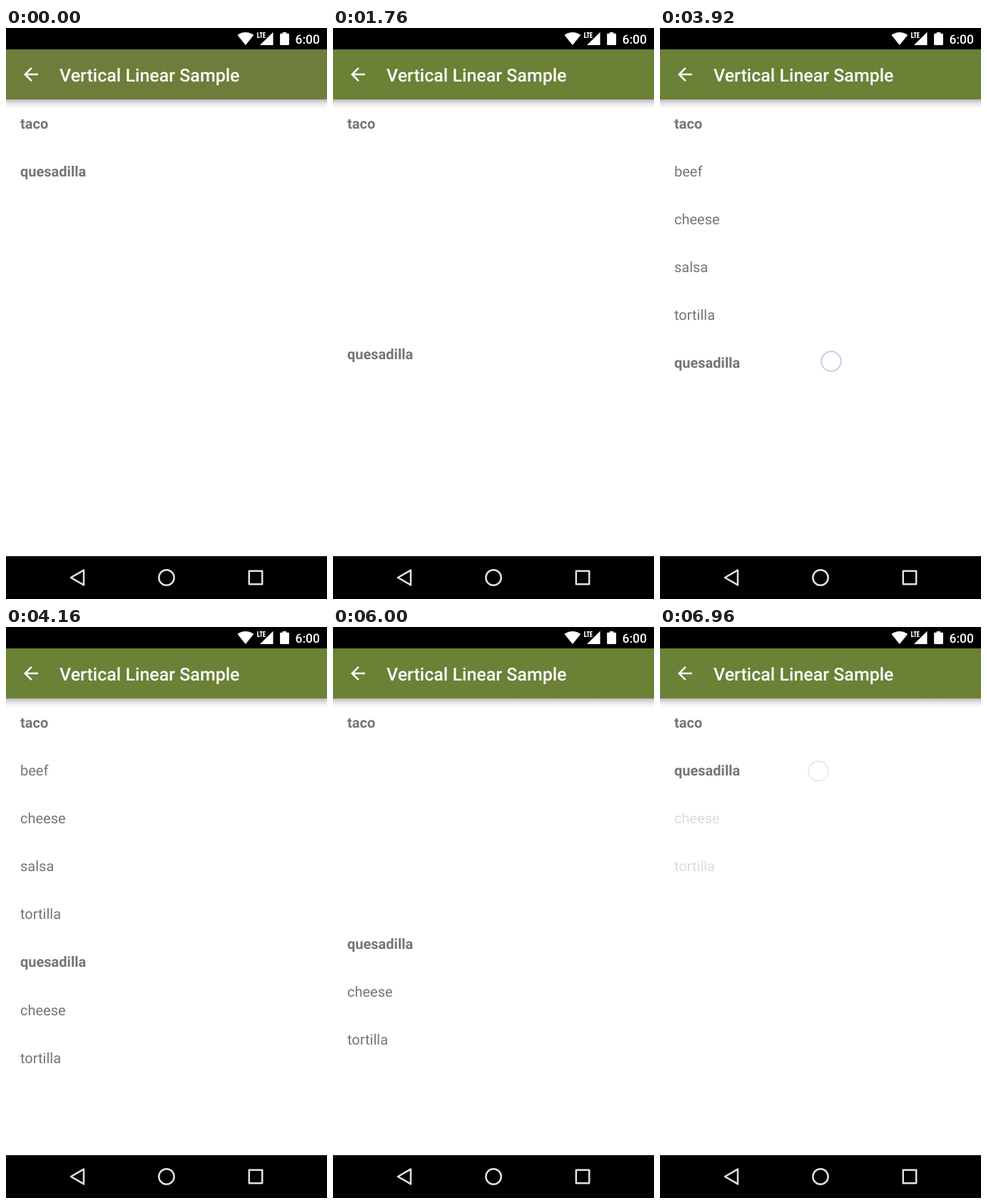
An HTML page that plays this animation: 450 px wide and 800 px high, repeating every 7040 ms.

```html
<!DOCTYPE html>
<html lang="en">
<head>
<meta charset="utf-8">
<title>Vertical Linear Sample</title>
<style>
  html, body { margin: 0; width: 100%; height: 100%; overflow: hidden; background: #fff; }
  svg { display: block; width: 100%; height: 100%; font-family: Roboto, sans-serif; text-rendering: geometricPrecision; }
  #list { font-size: 20px; fill: #757575; }
  .head { font-weight: 700; }
</style>
</head>
<body>
<svg viewBox="0 0 450 800">
  <defs>
    <linearGradient id="shade" x2="0" y2="1">
      <stop offset="0" stop-color="#302838" stop-opacity=".34"/>
      <stop offset=".3" stop-color="#302838" stop-opacity=".17"/>
      <stop offset=".65" stop-color="#302838" stop-opacity=".05"/>
      <stop offset="1" stop-color="#302838" stop-opacity="0"/>
    </linearGradient>
  </defs>
  <rect width="450" height="800" fill="#fff"/>
  <g id="list"></g>
  <rect y="100" width="450" height="14" fill="url(#shade)"/>

  <rect id="bar" y="30" width="450" height="70"/>
  <path transform="translate(20 50) scale(1.25)" fill="#fff" d="M20 11H7.83l5.59-5.59L12 4l-8 8 8 8 1.41-1.41L7.83 13H20z"/>
  <text x="75" y="74.5" font-size="25" font-weight="500" fill="#fff">Vertical Linear Sample</text>

  <rect width="450" height="30"/>
  <g fill="#fff">
    <path transform="translate(324.2 3.1) scale(.97)" d="M12 21.5 23.64 7C23.2 6.66 18.7 3 12 3S.8 6.66.36 7z"/>
    <path d="M356 24H374.5V5.8z"/>
    <path d="M352.8 6v7.2h3M355.6 6.7h4M357.6 6.7V14M363.6 6.7h-2.6v6.5h2.6M361 9.9h2.4" fill="none" stroke="#000" stroke-width="3"/>
    <path d="M352.8 6v7.2h3M355.6 6.7h4M357.6 6.7V14M363.6 6.7h-2.6v6.5h2.6M361 9.9h2.4" fill="none" stroke="#fff" stroke-width="1.5"/>
    <path d="M387.7 6h5.6v1.8h2.4q1.2 0 1.2 1.2v13.8q0 1.2-1.2 1.2h-10.4q-1.2 0-1.2-1.2V9q0-1.2 1.2-1.2h2.4z"/>
    <text x="440" y="21.6" font-size="17.5" font-weight="500" text-anchor="end">6:00</text>
  </g>

  <rect y="740" width="450" height="60"/>
  <g fill="none" stroke="#e2e2e2" stroke-width="2.5" stroke-linejoin="round">
    <path d="M91 770 109 759.6V780.4z"/>
    <circle cx="225" cy="770" r="10.7"/>
    <rect x="340.8" y="760.8" width="18.4" height="18.4"/>
  </g>
  <circle id="touch" r="13.8" fill="none" stroke="#d0cfe8" stroke-width="2.2"/>
</svg>
<script>
const LOOP = 7040, TICK = 80;
const ROW = 67.1, BASE = 141;
const FADE = 120, MOVE = 250;
const $ = id => document.getElementById(id);

const clamp = x => Math.min(1, Math.max(0, x));
const ease = x => (1 - Math.cos(Math.PI * clamp(x))) / 2;
const fade = (t, on, off) => clamp((t - on) / FADE) - clamp((t - off) / FADE);

// x, y, pressed, released, gone
const touches = [
  [208, 127, 1520, 1600, 1680],
  [240, 467, 3920, 4080, 4160],
  [191, 134, 5760, 5920, 6000],
  [222, 202, 6800, 6960, 7040]
];

function group(words, row) {
  const g = document.createElementNS("http://www.w3.org/2000/svg", "g");
  words.forEach((word, i) => {
    const el = document.createElementNS(g.namespaceURI, "text");
    el.setAttribute("x", 20);
    el.setAttribute("y", BASE + (row + i) * ROW);
    el.textContent = word;
    g.append(el);
  });
  $("list").append(g);
  return g;
}

group(["taco"], 0).setAttribute("class", "head");
const fillings = group(["beef", "cheese", "salsa", "tortilla"], 1);
const second = group(["quesadilla"], 1);
second.setAttribute("class", "head");
const extras = group(["cheese", "tortilla"], 2);

function draw(t) {
  const shift = 4 * ROW * (ease((t - 1545) / MOVE) - ease((t - 5950) / MOVE));
  for (const g of [second, extras]) g.setAttribute("transform", `translate(0 ${shift})`);
  fillings.setAttribute("opacity", fade(t, 1795, 5830));
  extras.setAttribute("opacity", fade(t, 4000, 6870));
  $("bar").setAttribute("fill", t < 1600 ? "#6e7e3a" : "#6a8136");

  const hit = touches.find(([, , on, , off]) => t >= on && t < off);
  const dot = $("touch");
  dot.setAttribute("opacity", hit ? (t < hit[3] ? 1 : 0.45) : 0);
  if (hit) {
    dot.setAttribute("cx", hit[0]);
    dot.setAttribute("cy", hit[1]);
  }
}

const start = performance.now();
function frame() {
  const t = (performance.now() - start) % LOOP;
  draw(Math.floor(t / TICK) * TICK);
  requestAnimationFrame(frame);
}
frame();
</script>
</body>
</html>
```
